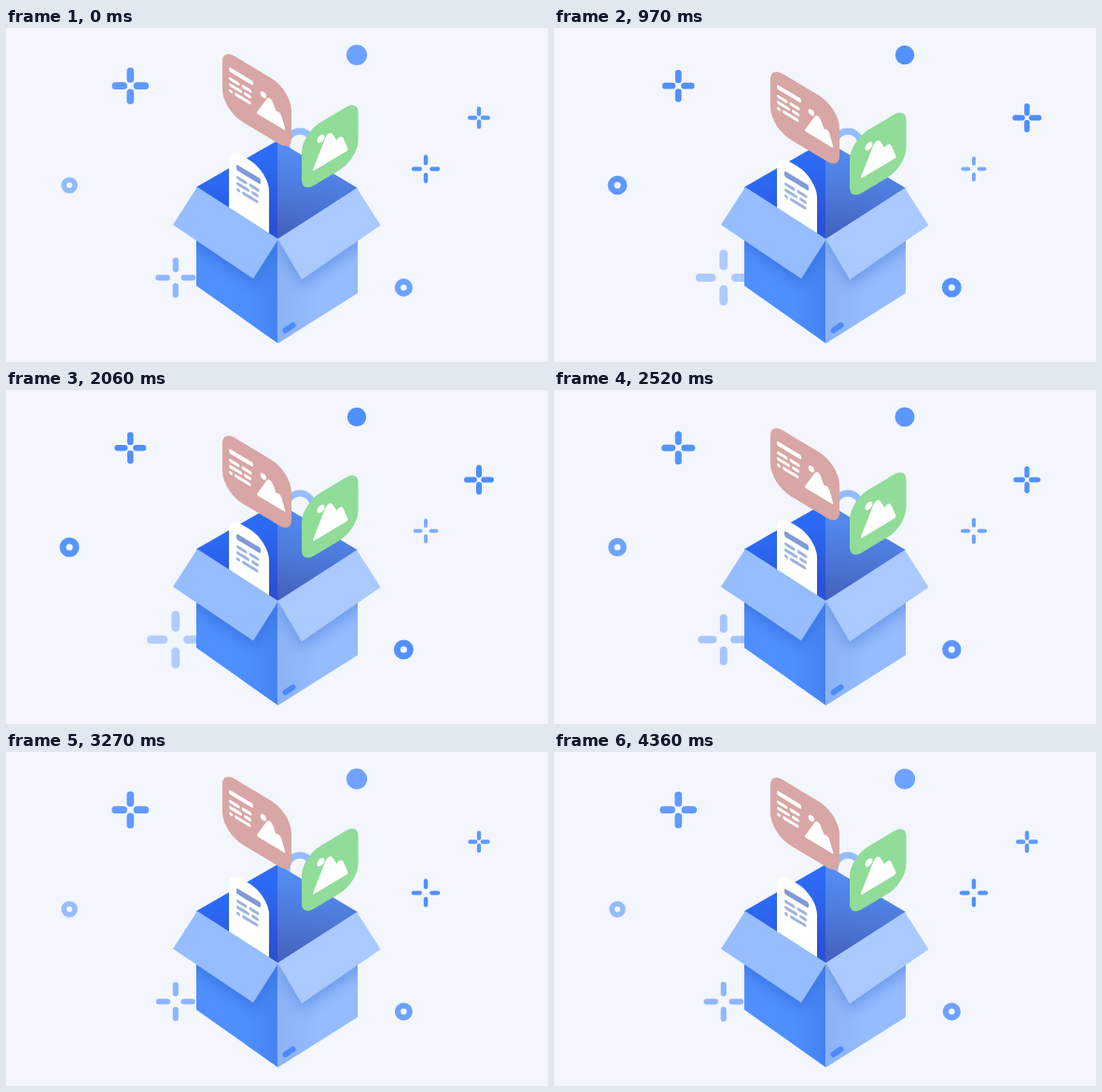
Recreate the animation shown at these times as an HTML page. Size 581 by 359 pixels, loop 4.39 s.

```html
<!DOCTYPE html>
<html lang="en">
<head>
<meta charset="utf-8">
<title>Box of files</title>
<style>
  html, body { margin: 0; width: 100%; height: 100%; overflow: hidden; background: #f3f6fd; }
  svg { display: block; width: 581px; height: 359px; }
</style>
</head>
<body>
<svg viewBox="0 0 581 359">
  <defs>
    <linearGradient id="innerLeft" x1="0" y1="0" x2=".25" y2="1">
      <stop offset="0" stop-color="#2f70fa"/><stop offset=".45" stop-color="#2c69f2"/><stop offset="1" stop-color="#2a52d6"/>
    </linearGradient>
    <linearGradient id="innerRight" x1=".3" y1="0" x2=".2" y2="1">
      <stop offset="0" stop-color="#5690f6"/><stop offset=".5" stop-color="#4e7bdc"/><stop offset="1" stop-color="#4460bd"/>
    </linearGradient>
    <linearGradient id="outerLeft" x1="0" y1="0" x2="1" y2="0">
      <stop offset="0" stop-color="#4f8ffd"/><stop offset=".6" stop-color="#4e8ffe"/><stop offset="1" stop-color="#4482f0"/>
    </linearGradient>
    <linearGradient id="outerRight" x1="0" y1="0" x2="1" y2="0">
      <stop offset="0" stop-color="#8bb2f5"/><stop offset=".5" stop-color="#95bcff"/><stop offset="1" stop-color="#95bcff"/>
    </linearGradient>
    <filter id="soft" x="-30%" y="-30%" width="160%" height="160%"><feGaussianBlur stdDeviation="7"/></filter>
    <clipPath id="faceL"><path d="M204 171L291.5 227V339L204 277Z"/></clipPath>
    <clipPath id="faceR"><path d="M291.5 227L377 172V285L291.5 339Z"/></clipPath>
    <path id="peaks" stroke-width="3" stroke-linejoin="round"
      d="M1.5 31.5L14.5 6Q17 2 19.5 6L24 15.500Q25 17.500 26.500 16Q29 13.500 31 17L36 31.5Z"/>
  </defs>

  <g id="marks"></g>

  <path d="M301 140V125a14 14 0 0 1 28 0V140" fill="none" stroke="#94bdff" stroke-width="7"/>
  <path d="M204 171L291 121V227Z" fill="url(#innerLeft)"/>
  <path d="M291 121L377 172L291 227Z" fill="url(#innerRight)"/>

  <g id="doc" fill="#9fb4de"></g>

  <path d="M204 171L291.5 227V339L204 277Z" fill="url(#outerLeft)"/>
  <path d="M291.5 227L377 172V285L291.5 339Z" fill="url(#outerRight)"/>
  <g clip-path="url(#faceL)"><path d="M204 176L291 232L266 277L180 219Z" fill="#2c62cf" opacity=".5" filter="url(#soft)"/></g>
  <g clip-path="url(#faceR)"><path d="M291 232L377 177L402 220L317 278Z" fill="#4f80d8" opacity=".55" filter="url(#soft)"/></g>
  <path d="M299.5 325L307.5 319.5" stroke="#4a8bfa" stroke-width="6" stroke-linecap="round"/>
  <path d="M205 171L292 227L265 269.500L179 211.500Z" fill="#95bdff"/>
  <path d="M291.500 227L376 172L401.500 212L317 270.500Z" fill="#a9c9ff"/>

  <g id="pink" fill="#fff"></g>
  <g id="green" fill="#fff"></g>
</svg>
<script>
const LOOP = 4390, PEAK = 1590, BLUE = '#4a8cff';
const byId = id => document.getElementById(id);
const mix = (a, b, p) => a + (b - a) * p;

// Rectangle whose corners alternate between a small and a large radius.
function leaf(w, h, a, b, color) {
  const arc = (r, x, y) => `a${r} ${r} 0 0 1 ${x} ${y}`;
  return `<path fill="${color}" d="M${a} 0H${w - b}${arc(b, b, b)}V${h - a}${arc(a, -a, a)}H${b}${arc(b, -b, -b)}V${a}${arc(a, a, -a)}Z"/>`;
}

const bar = (x, y, w, h, extra = '') =>
  `<rect x="${x}" y="${y}" width="${w}" height="${h}" rx="1.8" ${extra}/>`;

// A thick heading above three rows, each split in two.
function textRows(x, y, h, headAttr) {
  const row = (i, a, b, c) => {
    const top = y + h + 5.7 + i * 6.5;
    return bar(x, top, a, 3.6) + bar(x + b, top, c - b, 3.6);
  };
  return bar(x, y, 26, h, headAttr) + row(0, 11.5, 13.5, 24.5) + row(1, 14, 16, 24) + row(2, 4, 6, 23.5);
}

const picture = (x, y, s) =>
  `<g transform="translate(${x} ${y}) scale(${s})" stroke="#fff"><use href="#peaks"/><circle cx="8.5" cy="3" r="4" stroke="none"/></g>`;

byId('doc').innerHTML = leaf(43, 110, 13, 21, '#fff') + textRows(8, 13, 6.2, 'fill="#7f9bd6"');
byId('pink').innerHTML = leaf(74, 65.6, 13, 22, '#d8a6a4') + textRows(7, 15, 4.8) + picture(37, 20.6, .81);
byId('green').innerHTML =
  `<g transform="translate(60.5 0) scale(-1 1)">${leaf(60.5, 63.4, 13, 20, '#90dc98')}</g>` + picture(12, 14.6, 1);

// id, x, y at the highest and lowest point, vertical slope
const cards = [
  ['doc', 239, 126.8, 137.6, .6],
  ['pink', 232, 17.2, 46.8, .6],
  ['green', 317, 111.4, 123.9, -.6]
];

// shape, x, y, radius range, opacity range, stroke share, centre gap
const marks = [
  ['star', 133.3, 62.2, 20.4, 16.6, .84, .98, .39, .17],
  ['star', 507, 96.5, 11, 16.6, .85, 1, .37, .14],
  ['star', 450, 151.5, 15.7, 13, 1, .66, .29, .27],
  ['star', 181.8, 268.3, 19.3, 32.4, .64, .35, .29, .27],
  ['dot', 376, 29, 11.3, 10, .75, 1],
  ['ring', 68, 169, 8.4, 10.8, .48, .98, .66],
  ['ring', 426.3, 279, 9.4, 10.7, .76, .98, .66]
];

const shapes = {
  star(w, gap) {
    const a = gap + w / 2, b = 1 - w / 2;
    return `<path d="M0-${a}V-${b}M0 ${a}V${b}M-${a} 0H-${b}M${a} 0H${b}" stroke="${BLUE}" stroke-width="${w}" stroke-linecap="round"/>`;
  },
  dot: () => `<circle r="1" fill="${BLUE}"/>`,
  ring: w => `<circle r="${1 - w / 2}" fill="none" stroke="${BLUE}" stroke-width="${w}"/>`
};
byId('marks').innerHTML = marks.map(m => `<g>${shapes[m[0]](m[7], m[8])}</g>`).join('');
const markNodes = byId('marks').children;

function draw(time) {
  const p = (1 + Math.cos((time - PEAK) / LOOP * 2 * Math.PI)) / 2;
  for (const [id, x, high, low, slope] of cards)
    byId(id).setAttribute('transform', `matrix(1 ${slope} 0 1 ${x} ${mix(high, low, p)})`);
  marks.forEach(([, x, y, r0, r1, o0, o1], i) => {
    markNodes[i].setAttribute('transform', `translate(${x} ${y}) scale(${mix(r0, r1, p)})`);
    markNodes[i].setAttribute('opacity', mix(o0, o1, p));
  });
}

const start = performance.now();
function tick() {
  draw((performance.now() - start) % LOOP);
  requestAnimationFrame(tick);
}
tick();
</script>
</body>
</html>
```
